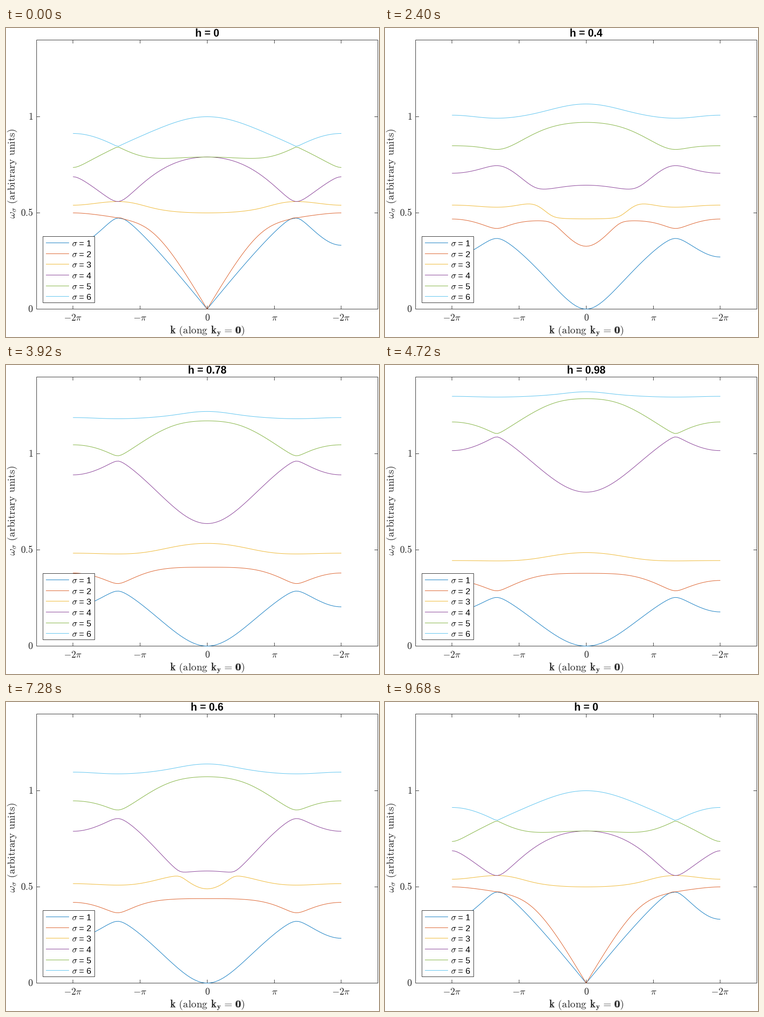
These frames come from a looping animation (822x681 px, 9.76 s). A matplotlib script:

```python
import numpy as np
import matplotlib.pyplot as plt
from matplotlib.animation import FuncAnimation
from matplotlib.patches import Rectangle

W, H, DPI = 822, 681, 64
PT = 72 / DPI                      # points per pixel
X0, Y0 = 443.3, 619.5              # pixel position of the data origin
SX, SY = 47.06, 424                # pixels per data unit
LEFT, TOP, RIGHT = 67.5, 26.5, 819.5
TICK = 7.5
GREY = "#262626"
COLORS = ["#0072BD", "#D95319", "#EDB120", "#7E2F8E", "#77AC30", "#4DBEEE"]

FRAMES, INTERVAL = 122, 80
HOLD, STEPS = 10, 50               # still frames at the start, steps up to h = 1

plt.rcParams["mathtext.fontset"] = "cm"
plt.rcParams["font.family"] = "Liberation Sans"
plt.rcParams["path.snap"] = False

# Kagome lattice: longitudinal and transverse springs, Lorentz-like coupling h
KL, KT = 1.0, 0.25
BONDS = [(0, 1, 0.0), (1, 2, 2 * np.pi / 3), (2, 0, np.pi / 3)]
k = np.linspace(-2 * np.pi, 2 * np.pi, 101)


def stiffness_root():
    """Square root of the dynamical matrix at every k (with ky = 0)."""
    d = np.zeros((k.size, 6, 6))
    for a, b, angle in BONDS:
        c, s = np.cos(angle), np.sin(angle)
        along, across = np.array([c, s]), np.array([-s, c])
        spring = KL * np.outer(along, along) + KT * np.outer(across, across)
        sa, sb = slice(2 * a, 2 * a + 2), slice(2 * b, 2 * b + 2)
        d[:, sa, sa] += 2 * spring
        d[:, sb, sb] += 2 * spring
        hop = -2 * np.cos(k * c / 2)[:, None, None] * spring
        d[:, sa, sb] += hop
        d[:, sb, sa] += hop
    val, vec = np.linalg.eigh(d)
    root = np.sqrt(np.clip(val, 0, None))
    return (vec * root[:, None, :]) @ vec.transpose(0, 2, 1)


ROOT = stiffness_root()
SPIN = np.kron(np.eye(3), np.array([[0, -2j], [2j, 0]]))


def bands(h):
    """The six non-negative branches, scaled to a maximum of 1 at h = 0."""
    m = np.zeros((k.size, 12, 12), complex)
    m[:, :6, 6:] = ROOT
    m[:, 6:, :6] = ROOT
    m[:, 6:, 6:] = h * SPIN
    return np.linalg.eigvalsh(m)[:, 6:].T / np.sqrt(6 * KL)


fig = plt.figure(figsize=(W / DPI, H / DPI), dpi=DPI, facecolor="white")
ax = fig.add_axes([0, 0, 1, 1])
ax.set_xlim(0, W)
ax.set_ylim(H, 0)
ax.axis("off")


def mid(v):
    """Centre of the pixel that holds v, for crisp straight lines."""
    return np.floor(v) + 0.5


def line(xs, ys, color=GREY, z=2):
    return ax.plot(xs, ys, color=color, lw=PT, solid_capstyle="butt", zorder=z)[0]


def box(x, y, x2, y2, z, face="none"):
    ax.add_patch(Rectangle((x, y), x2 - x, y2 - y, fc=face, ec=GREY, lw=PT, zorder=z))


def label(x, y, text, size, ha="center", color=GREY, **kw):
    return ax.text(x, y, text, fontsize=size * PT, ha=ha, va="baseline",
                   color=color, zorder=6, **kw)


# Frame, ticks and tick labels
box(LEFT, TOP, RIGHT, Y0, 2)
for n, name in zip(range(-2, 3), [r"-2\pi", r"-\pi", "0", r"\pi", r"-2\pi"]):
    x = mid(X0 + SX * np.pi * n)
    line([x, x], [Y0, Y0 - TICK])
    line([x, x], [TOP, TOP + TICK])
    label(x, 645, f"${name}$", 21)
for v in (0, 0.5, 1):
    y = mid(Y0 - SY * v)
    line([LEFT, LEFT + TICK], [y, y])
    line([RIGHT - TICK, RIGHT], [y, y])
    label(59.5, y + 6.5, f"${v}$", 21, ha="right")

GAP = r"\hspace{0.38}"
THIN = r"\hspace{0.116}"
BOLD_ZERO = r"0\hspace{-0.5}0"     # bold digits are missing, so strike twice
label(X0, 673, r"$\mathbf{k}" + GAP + r"\mathrm{(along}" + GAP
      + r"\mathbf{k}_{\mathbf{y}}" + THIN + "=" + THIN
      + BOLD_ZERO + r"\mathrm{)}$", 23)
label(20, 321, r"$\omega_{\sigma}" + GAP + r"\mathrm{(arbitrary}" + GAP
      + r"\mathrm{units)}$", 23, rotation=90, rotation_mode="anchor")

title = label(X0, 19, "", 23, color="black", weight="bold")
curves = [line([], [], c, 3) for c in COLORS]

# Legend
box(81.5, 459.5, 195.5, 605.5, 4, "white")
for i, c in enumerate(COLORS):
    y = mid(473.6 + 23.6 * i)
    line([88, 139], [y, y], c, 5)
    label(145, y + 7.7, r"$\sigma$", 19, ha="left", color="black")
    label(161, y + 7.7, f"= {i + 1}", 19, ha="left", color="black")


def draw(i):
    step = min(max(min(i - HOLD, FRAMES - 1 - i), 0), STEPS)
    h = step / STEPS
    title.set_text(f"h = {h:g}")
    for curve, w in zip(curves, bands(h)):
        curve.set_data(X0 + SX * k, Y0 - SY * w)
    return [title, *curves]


anim = FuncAnimation(fig, draw, frames=FRAMES, interval=INTERVAL, repeat=True)
plt.show()
```
